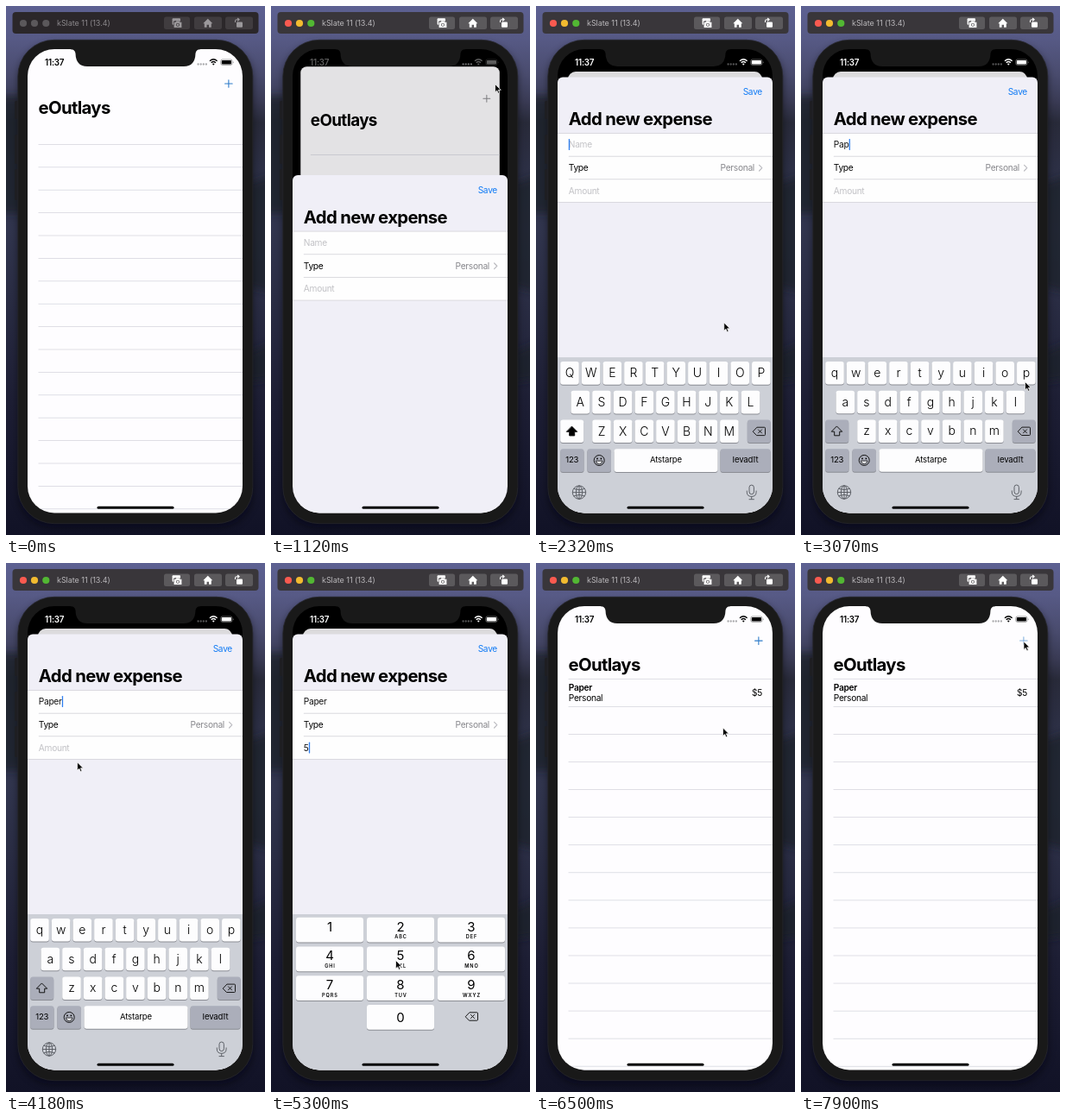
Recreate the animation shown at these times as an HTML page. Size 300x613 px, loop 7990 ms.

```html
<!DOCTYPE html>
<html lang="en">
<head>
<meta charset="utf-8">
<style>
html, body { margin: 0; width: 100%; height: 100%; overflow: hidden; background: #14152b; }
svg { display: block; width: 300px; height: 613px; }
text { font-family: Inter, "Liberation Sans", sans-serif; font-size: 10.2px; letter-spacing: -.03em; }
.big { font-size: 20.3px; font-weight: 700; letter-spacing: -.032em; }
.cap { font-size: 14px; font-weight: 350; letter-spacing: 0; }
.end { text-anchor: end; }
.mid { text-anchor: middle; }
.line { fill: none; stroke-linecap: round; stroke-linejoin: round; }
</style>
</head>
<body>
<svg id="stage" viewBox="0 0 300 613"></svg>
<script>
const LOOP = 7990, FRAME = 92.9;
const DEVICE = 'kSlate 11 (13.4)', APP = 'eOutlays', ITEM = 'Paper';
const RED = '#fa5a50', AMBER = '#f2bb30', GREEN = '#52b733';
const LEFT = 25, WIDE = 249, RIGHT = LEFT + WIDE;

const rect = (x, y, w, h, fill, r = 0, more = '') =>
  `<rect x="${x}" y="${y}" width="${w}" height="${h}" rx="${r}" fill="${fill}" ${more}/>`;
const text = (x, y, s, more = '') => `<text x="${x}" y="${y}" ${more}>${s}</text>`;
const path = (d, stroke, w = 1, more = '') =>
  `<path class="line" d="${d}" stroke="${stroke}" stroke-width="${w}" ${more}/>`;
const group = (id, body, more = '') => `<g id="${id}" ${more}>${body}</g>`;
const many = (n, f) => Array.from({ length: n }, (_, i) => f(i)).join('');

function wallpaper() {
  const stops = [[0, '#5d6192'], [.06, '#575a86'], [.13, '#494b6d'], [.18, '#3a3b55'], [.22, '#282a39'],
    [.3, '#2c2f44'], [.42, '#31354e'], [.55, '#2a2d44'], [.75, '#1d1e34'], [1, '#111226']];
  return `<defs><linearGradient id="sky" x2="0" y2="1">${
    stops.map(([o, c]) => `<stop offset="${o}" stop-color="${c}"/>`).join('')}</linearGradient>
    <filter id="soft" x="-20%" y="-20%" width="140%" height="140%"><feGaussianBlur stdDeviation="4"/></filter>
    <clipPath id="glass"><rect x="${LEFT}" y="50" width="${WIDE}" height="537.4" rx="31"/></clipPath></defs>
    ${rect(0, 0, 300, 613, 'url(#sky)')}
    <path d="M-9 104H20V240H-9ZM309 196L280 206V325L309 332ZM309 390L280 402V436L309 432Z" fill="#1f2029" opacity=".75" filter="url(#soft)"/>
    ${rect(14, 44, 272, 560, '#05060f', 40, 'opacity=".5" filter="url(#soft)"')}`;
}

function titleBar() {
  const buttons = [[183, 30], [218, 32], [254, 32]];
  return rect(7.5, 7, 285, 25, '#2b272a', 4, 'id="bar"')
    + [20, 33, 46.3].map(x => `<circle class="lamp" cx="${x}" cy="20" r="4.1"/>`).join('')
    + text(59, 23.2, DEVICE, 'id="device" style="font-size:9px;letter-spacing:-.005em"')
    + buttons.map(([x, w]) => rect(x, 12.4, w, 14.6, '', 2.5, 'class="btn"')).join('')
    + group('icons', `
      ${rect(192.6, 14.2, 9.4, 7.6, 'inherit', 1)}<path class="hole" d="M193.6 20l2.6-3.2 2 2 1.4-1.4 1.6 1.6v1z"/>
      <path class="hole" d="M194 17.6h10.4v8H194z"/>
      <path d="M194.6 18.8h1.9l1-1.2h3l1 1.2h1.9v6.2h-8.8z"/>
      <circle class="hole" cx="199" cy="21.7" r="2"/><circle cx="199" cy="21.7" r="1.2"/>
      <path d="M228.3 20.2l5.5-5.4 5.5 5.4h-1.5v4.5h-2.8v-3h-2.4v3h-2.8v-4.5z"/>
      ${rect(267, 18.5, 7, 6.2, 'inherit', 1)}
      <path class="line" d="M265.5 18.5v-1q0-1.8 2-1.8h2.5m-1.6-1.4l1.8 1.4-1.8 1.4" stroke-width="1.1" style="fill:none"/>`);
}

function phone() {
  return [[110, 21], [149, 34], [189, 36]].map(([y, h]) => rect(10, y, 6, h, '#1e1e22', 1.5)).join('')
    + rect(13.8, 39.3, 272, 560.4, '#191919', 42, 'stroke="#27282c" stroke-width=".8"')
    + rect(LEFT, 50, WIDE, 537.4, '#000', 31);
}

function home() {
  const rules = (y, step, n) => many(n, i => rect(37.5, y + i * step - .4, RIGHT - 37.5, .8, '#d7d8df'));
  return group('card', rect(LEFT, 50, WIDE, 600, '#fefdff', 0, 'id="page"')
    + path('M253.6 90h8.6M257.9 85.7v8.6', '#2f7cc9', 1.1, 'id="plus"')
    + text(37.5, 124.7, APP, 'class="big"')
    + group('empty', rules(160.4, 26.4, 17))
    + group('full', rules(134.3, 32.07, 15)
      + text(37.8, 148.2, ITEM, 'font-weight="600"') + text(37.8, 160.3, 'Personal')
      + text(262, 154.3, '$5', 'class="end"'))
    + rect(LEFT, 50, WIDE, 600, '#000', 0, 'id="dim"'));
}

function sheet() {
  const rule = (x, y) => rect(x, y - .4, RIGHT - x, .8, '#d3d2d8');
  return group('sheet', rect(LEFT, 82.5, WIDE, 540, '#f0eff7', 6)
    + text(262, 103.2, 'Save', 'class="end" id="save"')
    + text(37.8, 138, 'Add new expense', 'class="big"')
    + rect(LEFT, 147.5, WIDE, 80, '#fefefe')
    + rule(LEFT, 147.5) + rule(37.8, 174.2) + rule(37.8, 200.8) + rule(LEFT, 227.5)
    + text(37.8, 164, '', 'id="name"') + text(37.8, 191.3, 'Type')
    + text(253, 191.3, 'Personal', 'class="end" fill="#87878c"')
    + path('M258.6 184.4l3.2 3.3-3.2 3.3', '#bcbcc1', 1.2)
    + text(37.8, 217.7, '', 'id="amount"')
    + rect(0, 0, 1.3, 13, '#2f7ff0', .6, 'id="caret"'));
}

const erase = (x, y) => path(`M${x - 7} ${y}l4.4-4.7h8.6q1 0 1 1v7.4q0 1-1 1h-8.6zM${x - 1} ${y - 2}l4 4m0-4l-4 4`, '#111', .95);
const key = (x, y, w, fill = '#fdfdfe', h = 26.6, id = '') =>
  rect(x, y + 1, w, h, '#8b8d94', 3) + rect(x, y, w, h, fill, 3, id);

function letters() {
  const grey = '#abaeba', rows = ['qwertyuiop', 'asdfghjkl', 'zxcvbnm'], starts = [39, 51.3, 76];
  const caps = rows.map((row, r) => [...row].map((c, i) => {
    const x = starts[r] + i * 24.65, y = 412 + r * 33.7;
    return key(x - 10.8, y, 21.6) + text(x, y + 18, c, 'class="mid cap"');
  }).join('')).join('');
  const label = (x, s) => text(x, 529.3, s, 'class="mid" style="font-size:9.6px;letter-spacing:-.02em"');
  return group('letters', caps
    + key(28.2, 479.4, 27, grey, 26.6, 'id="shiftKey"')
    + '<path id="shift" class="line" d="M41.7 487.2l6 6h-3v4.6h-6v-4.6h-3z" stroke="#111" stroke-width="1"/>'
    + key(244.8, 479.4, 26.8, grey) + erase(258.5, 492.8)
    + key(28.2, 513.2, 27.3, grey) + label(41.8, '123')
    + key(59.4, 513.2, 27.6, grey)
    + '<circle cx="73.2" cy="526.4" r="6" fill="none" stroke="#111"/><circle cx="71" cy="524.4" r=".9"/><circle cx="75.4" cy="524.4" r=".9"/>'
    + '<path d="M69.4 527h7.6q-.6 3.8-3.8 3.8t-3.8-3.8z" fill="#e4e5ea" stroke="#111" stroke-width=".8"/>'
    + key(90.5, 513.2, 120, '#fdfdfe') + label(150.4, 'Atstarpe')
    + key(213.5, 513.2, 58, grey) + label(242.5, 'Ievadīt')
    + `<g fill="none" stroke="#53565d" stroke-width=".9"><circle cx="50" cy="563.5" r="7.7"/><ellipse cx="50" cy="563.5" rx="3.6" ry="7.7"/>
       <path d="M42.3 563.5h15.4M50 555.8v15.4M43.8 559.3q6.2 2.8 12.4 0M43.8 567.7q6.2-2.8 12.4 0"/>
       <rect x="247" y="555" width="5.4" height="10.6" rx="2.7"/><path d="M244.3 561.5v1.6q0 5.2 5.4 5.2t5.4-5.2v-1.6M249.7 568.3v3.2M246.6 571.6h6.2"/></g>`);
}

function digits() {
  const subs = ['', 'ABC', 'DEF', 'GHI', 'JKL', 'MNO', 'PQRS', 'TUV', 'WXYZ'];
  const digit = (x, y, s) => text(x, y, s, 'class="mid" style="font-size:15px;letter-spacing:0"');
  return group('digits', many(9, i => {
    const x = 29 + i % 3 * 82, y = 410.8 + Math.floor(i / 3) * 33.7;
    return key(x, y, 78, '#fdfdfe', 28.8) + digit(x + 39, y + 15.8, i + 1)
      + text(x + 39.5, y + 24.6, subs[i], 'class="mid" style="font-size:5.6px;font-weight:600;letter-spacing:.16em"');
  }) + key(111, 511.9, 78, '#fdfdfe', 28.8) + digit(150, 531.6, 0) + erase(232.5, 525.5));
}

function status() {
  return group('status', text(45, 68.8, '11:37', 'font-weight="600" style="font-size:9.8px;letter-spacing:-.02em"')
    + group('dots', many(4, i => `<circle cx="${222.6 + i * 3.1}" cy="67.5" r="1.15"/>`), 'fill="#a9a9ac"')
    + `<path class="line" d="M236 63.7q4.3-3.9 8.6 0M237.7 65.7q2.6-2.2 5.2 0" stroke="currentColor" stroke-width="1.4" style="stroke-linecap:butt"/>
       <path d="M238.9 67q1.4-1 2.8 0l-1.4 1.7z"/>
       <rect x="248.8" y="62" width="13.2" height="6.4" rx="1.9" fill="none" stroke="currentColor" stroke-width=".6" opacity=".6"/>
       <rect x="249.8" y="63" width="11.2" height="4.4" rx="1"/><path d="M262.9 64.2q1.4 1 0 2z" opacity=".6"/>`, 'fill="currentColor"');
}

const stage = document.getElementById('stage');
stage.innerHTML = wallpaper() + titleBar() + phone()
  + `<g clip-path="url(#glass)">${home()}${sheet()}`
  + group('keys', rect(LEFT, 407, WIDE, 190, '#cdd0d7') + letters() + digits())
  + status() + rect(105.5, 579.8, 89, 3, '#050505', 1.5) + '</g>'
  + '<path d="M75 49V50.3Q80 50.3 80.5 55Q81 70 94 70H206Q219 70 219.5 55Q220 50.3 225 50.3V49Z" fill="#191919"/>'
  + '<path id="mouse" d="M0 0V9.4L2.2 7.4 3.7 10.8 5.3 10.1 3.8 6.8H6.8Z" fill="#050505" stroke="#fff" stroke-width=".7"/>';

const $ = id => document.getElementById(id);
const set = (id, attrs) => { for (const k in attrs) $(id).setAttribute(k, attrs[k]); };
const show = (id, on) => set(id, { visibility: on ? 'visible' : 'hidden' });
const paint = (sel, fill) => stage.querySelectorAll(sel).forEach((el, i) =>
  el.setAttribute('fill', Array.isArray(fill) ? fill[i] : fill));
const between = (t, a, b) => t >= a && t < b;
const spring = (ms, w) => ms <= 0 ? 0 : 1 - (1 + w * ms / 1000) * Math.exp(-w * ms / 1000);

// time, x, y of the pointer
const route = [[270, 304, 150], [640, 260, 91], [1120, 259.5, 90.5], [1670, 84, 161], [2050, 84, 161],
  [2450, 260, 432], [2540, 260, 432], [2790, 51, 460], [2840, 51, 460], [3030, 259.5, 435.5],
  [3130, 259.5, 435.5], [3480, 89, 430], [3540, 89, 430], [3720, 113, 428], [3800, 113, 428],
  [4260, 80, 214], [4640, 80, 214], [5080, 144.5, 460.5], [5400, 144.5, 460.5], [5950, 250, 100],
  [6150, 250, 100], [6500, 216.5, 191], [6960, 192, 300], [7160, 192, 300], [7800, 258, 91], [LOOP, 258, 91]];
function pointer(t) {
  const i = route.findIndex(p => p[0] > t);
  if (i < 1) return [320, 150];
  const [t0, x0, y0] = route[i - 1], [t1, x1, y1] = route[i];
  const u = (t - t0) / (t1 - t0), e = u * u * (3 - 2 * u);
  return [x0 + (x1 - x0) * e, y0 + (y1 - y0) * e];
}

const strokes = [2500, 2780, 3050, 3520, 3760];
const NAME_TAP = 1780, AMOUNT_TAP = 4440, DIGIT_TAP = 5180, DISMISS = 6080;

function drawWindow(active) {
  paint('#bar', active ? '#39363a' : '#2b272a');
  paint('.lamp', active ? [RED, AMBER, GREEN] : '#5b585b');
  paint('#device', active ? '#b9b7ba' : '#8a878a');
  paint('.btn', active ? '#5b595c' : '#403c3f');
  paint('.hole', active ? '#5b595c' : '#403c3f');
  const icon = active ? '#fff' : '#9b989b';
  set('icons', { fill: icon, stroke: 'none' });
  stage.querySelector('#icons .line').setAttribute('stroke', icon);
  paint('#icons rect', icon);
}

function drawForm(t) {
  const typed = ITEM.slice(0, strokes.filter(s => s <= t).length);
  const sum = t >= DIGIT_TAP ? '5' : '';
  const fields = [['name', typed, 'Name'], ['amount', sum, 'Amount']];
  for (const [id, value, hint] of fields) {
    $(id).textContent = value || hint;
    set(id, { fill: value ? '#111' : '#c2c2c6' });
  }
  const onAmount = t >= AMOUNT_TAP, value = onAmount ? sum : typed;
  const last = Math.max(...[NAME_TAP, ...strokes, AMOUNT_TAP, DIGIT_TAP].filter(s => s <= t), 0);
  show('caret', between(t, NAME_TAP, DISMISS) && (t - last) % 1000 < 620);
  set('caret', {
    x: 37.8 + (value ? $(onAmount ? 'amount' : 'name').getComputedTextLength() + .3 : 0),
    y: onAmount ? 207.6 : 154
  });
  const upper = !typed;
  stage.querySelectorAll('.cap').forEach(el => {
    const c = el.textContent;
    el.textContent = upper ? c.toUpperCase() : c.toLowerCase();
  });
  set('shiftKey', { fill: upper ? '#fdfdfe' : '#abaeba' });
  set('shift', { style: `fill:${upper ? '#000' : 'none'}` });
  show('letters', !onAmount);
  show('digits', onAmount);
  set('save', { fill: between(t, 5990, DISMISS) ? '#9cc6f8' : '#137cf5' });
}

function draw(t) {
  drawWindow(t >= 640);
  const out = spring(t - DISMISS, 18.5);
  const p = spring(t - 928, 15.2) * (1 - out);
  const s = 1 - .096 * p;
  set('card', { transform: `translate(${149.75 * (1 - s)} ${50 + 26 * p - 50 * s}) scale(${s})` });
  set('page', { rx: 10 * p });
  set('dim', { opacity: .135 * p, rx: 10 * p });
  const pressed = between(t, 830, 925) || t >= 7840;
  set('plus', { stroke: p > .02 ? (p > .4 ? '#8b8b8e' : '#5f84ab') : '#2f7cc9', opacity: pressed ? .6 : 1 });
  show('empty', t < DISMISS);
  show('full', t >= DISMISS);
  set('sheet', { transform: `translate(0 ${506 * (1 - p)})` });
  const up = spring(t - NAME_TAP, 18) * (1 - out);
  set('keys', { transform: `translate(0 ${186 * (1 - up)})` });
  const g = Math.round(255 * p ** 4);
  set('status', { color: `rgb(${g},${g},${g})` });
  set('dots', { opacity: 1 - .5 * p });
  drawForm(t);
  const [x, y] = pointer(t);
  set('mouse', { transform: `translate(${x} ${y})` });
}

const start = performance.now();
function tick() {
  const t = (performance.now() - start) % LOOP;
  draw(Math.floor((t + 4) / FRAME) * FRAME);
  requestAnimationFrame(tick);
}
tick();
</script>
</body>
</html>
```
